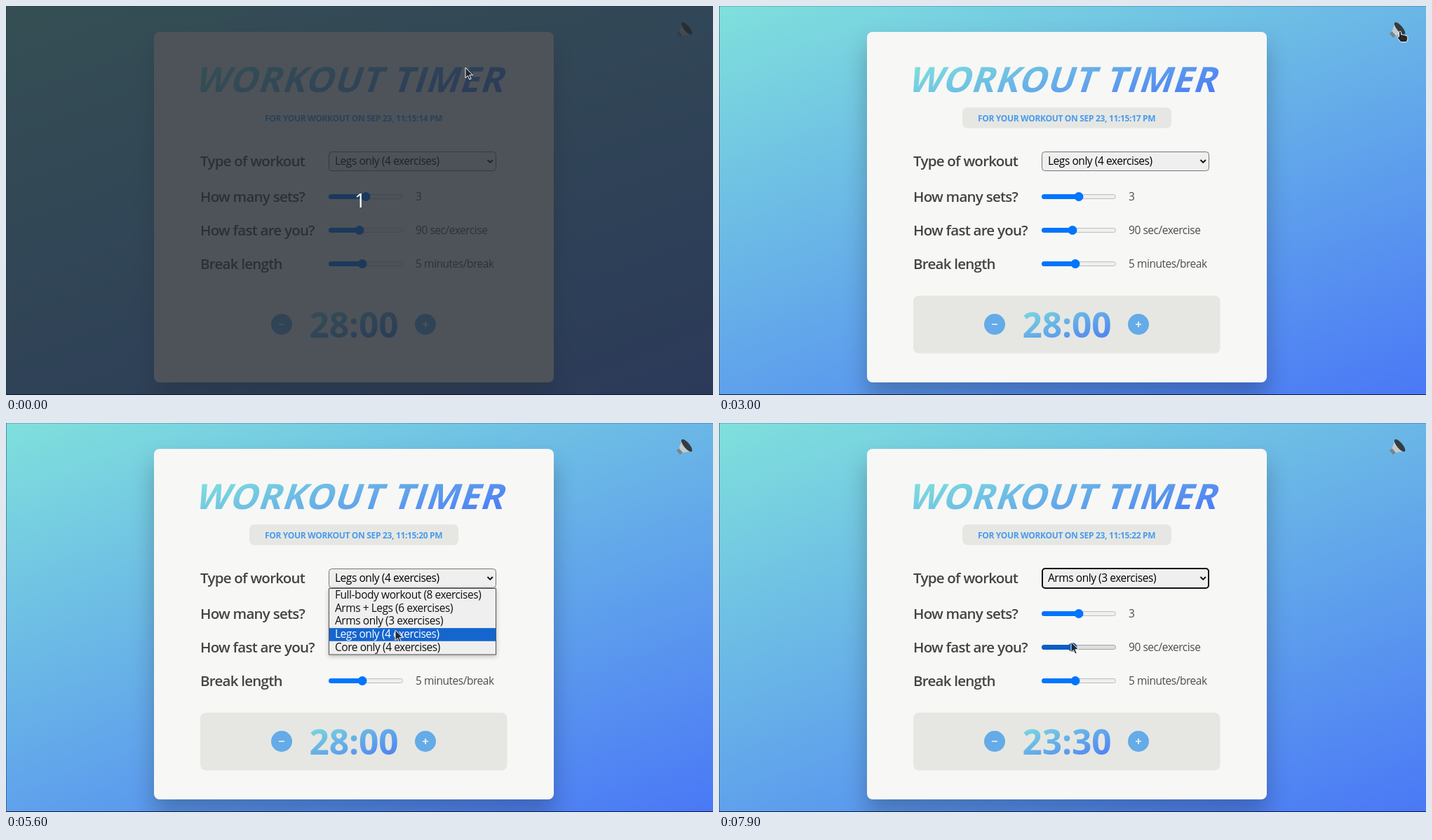
These frames come from a looping animation (1008 px wide and 556 px high, 8 s). An HTML page:

```html
<!DOCTYPE html>
<html lang="en">
<head>
<meta charset="utf-8">
<title>Workout timer</title>
<style>
  html, body { margin: 0; width: 100%; height: 100%; overflow: hidden; background: #67aeea; }
  svg { display: block; width: 100vw; height: 100vh; font-family: "Open Sans", "Noto Sans", sans-serif; }
  .card { filter: drop-shadow(0 20px 16px rgba(0, 0, 0, .24)); }
  .panel { fill: #e6e7e2; }
  .title { font-size: 50px; font-weight: 700; letter-spacing: 1.1px; fill: url(#titleInk); }
  .date { font-size: 12px; font-weight: 700; letter-spacing: -.33px; fill: #4a9bee; }
  .label { font-size: 20.5px; font-weight: 600; letter-spacing: -.75px; fill: #444; }
  .value, .option { font-size: 15.5px; letter-spacing: -.45px; }
  .value { fill: #4d4d4d; }
  .clock { font-size: 49.5px; font-weight: 700; text-anchor: middle; fill: url(#clockInk); }
  .popup { filter: drop-shadow(0 2px 3px rgba(0, 0, 0, .25)); }
  .count { font-size: 28px; text-anchor: middle; fill: #fff; }
  .pointer { fill: #25282c; stroke: #f4f4f4; stroke-linejoin: round; }
</style>
</head>
<body>
<svg viewBox="0 0 1008 556" preserveAspectRatio="none">
  <defs>
    <linearGradient id="sky" gradientUnits="userSpaceOnUse" x1="356" y1="-129" x2="652" y2="685">
      <stop stop-color="#7fe0dc"/><stop offset="1" stop-color="#4a78f6"/>
    </linearGradient>
    <linearGradient id="titleInk" href="#sky" x1="462" y1="13" x2="529" y2="197"/>
    <linearGradient id="clockInk" href="#sky" x1="480" y1="411" x2="512" y2="499"/>
  </defs>

  <rect width="1008" height="556" fill="url(#sky)"/>
  <rect width="1" height="556" fill="#00143c" opacity=".4"/>
  <rect width="1008" height="1" fill="#00143c" opacity=".2"/>

  <g transform="translate(966 36) rotate(-40)">
    <path d="M-10-4h5L5-10V10L-5 4h-5z" fill="#c3cbcf"/>
    <path d="M-10-4h5v8h-5z" fill="#738591"/>
    <ellipse cx="6" rx="4" ry="11" fill="#353b3f"/>
  </g>
  <g id="mute" fill="none" stroke="#d9343a" stroke-width="3">
    <circle cx="967" cy="34" r="12"/><path d="M959 26l16 16"/>
  </g>

  <rect class="card" x="211" y="37" width="570" height="501" rx="8" fill="#f7f7f5"/>
  <g id="panels">
    <rect class="panel" x="347" y="145" width="298" height="29.5" rx="7"/>
    <rect class="panel" x="277" y="414" width="437.5" height="82.5" rx="8"/>
  </g>
  <text class="title" transform="translate(0 123) skewX(-18) translate(0 -123)" x="268" y="123">WORKOUT TIMER</text>
  <text class="date" id="date" x="369" y="164.5"></text>

  <text class="label" x="277" y="229">Type of workout</text>
  <rect x="460.5" y="208.5" width="238" height="27" rx="4" fill="#efefef" stroke="#767676"/>
  <rect id="focus" x="461" y="208" width="237" height="28" rx="4" fill="none" stroke="#101010" stroke-width="2"/>
  <text class="option" id="choice" x="469" y="227"></text>
  <path d="M686.5 220l3.7 3.7 3.7-3.7" fill="none" stroke="#111" stroke-width="2"/>
  <g id="sliders"></g>

  <g fill="#64abe8"><circle cx="393" cy="455" r="15"/><circle cx="598" cy="455" r="15"/></g>
  <path d="M389 455h8M594 455h8M598 451v8" stroke="#f7f7f5" stroke-width="1.7"/>
  <text class="clock" id="clock" x="496" y="474"></text>

  <g id="popup">
    <rect class="popup" x="460.5" y="236.5" width="238" height="94.5" fill="#efefef" stroke="#555"/>
    <rect id="highlight" x="461" width="237" height="18.7" fill="#1565cf"/>
    <g id="options"></g>
  </g>

  <g id="dim">
    <rect width="1008" height="556" fill="#242b33" opacity=".8"/>
    <text class="count" x="505" y="288">1</text>
  </g>
  <rect y="555" width="1008" height="1" fill="#0c1738"/>

  <g id="pointer">
    <path class="pointer" id="arrow" d="M0 0V14.8L3.4 11.6 5.8 17 8.2 16 5.9 10.7H10.5z"/>
    <g id="beam" fill="none">
      <path d="M-3-6.5h6M0-6.5v13M-3 6.5h6" stroke="#eee" stroke-width="3"/>
      <path d="M-3-6.5h6M0-6.5v13M-3 6.5h6" stroke="#333"/>
    </g>
    <path class="pointer" id="hand" d="M-1.5 8V1Q0-1 1.7 1V5Q3.5 4 5 5.5 7 4.8 8 6.3 10.6 6 10.8 8.5V12L9.2 15.5H1L-3.8 9.5Q-4 7-1.5 8z"/>
  </g>
</svg>
<script>
const LOOP = 8000, ROW_TOP = 237, ROW = 18.7;
const el = id => document.getElementById(id);
const show = (id, visible) => el(id).setAttribute('opacity', Number(visible));
const setText = (id, text) => { el(id).textContent = text; };

const options = ['Full-body workout (8 exercises)', 'Arms + Legs (6 exercises)',
  'Arms only (3 exercises)', 'Legs only (4 exercises)', 'Core only (4 exercises)'];

// label, value, centre line, thumb position
const sliders = [
  ['How many sets?', '3', 272.5, 513],
  ['How fast are you?', '90 sec/exercise', 320.5, 504],
  ['Break length', '5 minutes/break', 368.5, 508]
];

// time, x, y of the pointer tip
const path = [
  [700, 655, 88], [1000, 700, 165], [1200, 780, 130], [1400, 900, 50], [1600, 985, 5],
  [1800, 984, 18], [2100, 971, 36], [3100, 971, 36], [3200, 962, 44], [3500, 835, 135],
  [3800, 645, 226], [3900, 625, 236], [4100, 624, 236], [4600, 574, 266], [4900, 568, 297],
  [5000, 547, 306], [5200, 547, 306], [5600, 555, 296], [5900, 551, 283], [6900, 551, 283],
  [7000, 549, 281], [7400, 516, 327], [7700, 502, 313]
];

el('sliders').innerHTML = sliders.map(([label, value, y, thumb], i) => `
  <text class="label" x="277" y="${y + 7}">${label}</text>
  <text class="value" x="584" y="${y + 5}">${value}</text>
  <rect id="track${i}" x="460.5" y="${y - 3}" width="105" height="6" rx="3" fill="#efefef" stroke="#bdbdbd"/>
  <g id="fill${i}"><rect x="460" y="${y - 3.5}" width="${thumb - 460}" height="7" rx="3.5"/>
  <circle cx="${thumb}" cy="${y}" r="6.5"/></g>`).join('');

el('options').innerHTML = options.map((name, i) =>
  `<text class="option" id="option${i}" x="469" y="${251 + ROW * i}">${name}</text>`).join('');

function pointerAt(t) {
  const next = path.findIndex(key => key[0] > t);
  if (next === 0) return path[0].slice(1);
  if (next < 0) return path[path.length - 1].slice(1);
  const [t0, x0, y0] = path[next - 1], [t1, x1, y1] = path[next];
  const p = (t - t0) / (t1 - t0);
  return [x0 + (x1 - x0) * p, y0 + (y1 - y0) * p];
}

function drawSliders(t) {
  sliders.forEach((_, i) => {
    const hovered = i === 1 && t >= 7500;
    const pressed = hovered && t >= 7700 && t < 7900;
    el('fill' + i).setAttribute('fill', pressed ? '#3793ff' : hovered ? '#0b5dc6' : '#0075ff');
    el('track' + i).setAttribute('fill', hovered && !pressed ? '#dedede' : '#efefef');
    el('track' + i).setAttribute('stroke', hovered && !pressed ? '#a3a3a3' : '#bdbdbd');
  });
}

function drawPopup(t, y) {
  show('popup', t < 4100 || t >= 6200 ? 0 : t >= 6100 ? .4 : 1);
  const row = y > ROW_TOP ? Math.min(4, Math.floor((y - ROW_TOP) / ROW)) : 3;
  el('highlight').setAttribute('y', ROW_TOP + ROW * row);
  options.forEach((_, i) => el('option' + i).setAttribute('fill', i === row ? '#fff' : '#111'));
}

function draw(t) {
  const [x, y] = pointerAt(t);
  const dimmed = t < 100, chosen = t >= 6100;

  show('dim', dimmed);
  show('panels', !dimmed);
  show('mute', t >= 2300 && t < 3000);
  show('focus', chosen);
  setText('date', `FOR YOUR WORKOUT ON SEP 23, 11:15:${14 + Math.floor((t + 500) / 1000)} PM`);
  setText('choice', options[chosen ? 2 : 3]);
  setText('clock', chosen ? '23:30' : '28:00');
  drawSliders(t);
  drawPopup(t, y);

  const shape = t >= 100 && t < 900 ? 'beam' : t >= 2000 && t < 3200 ? 'hand' : 'arrow';
  for (const id of ['arrow', 'beam', 'hand']) show(id, id === shape);
  el('pointer').setAttribute('transform', `translate(${x} ${y})`);
}

// The screen refreshes ten times a second.
const start = performance.now();
function tick() {
  const t = (performance.now() - start) % LOOP;
  draw(Math.floor(t / 100) * 100);
  requestAnimationFrame(tick);
}
tick();
</script>
</body>
</html>
```
